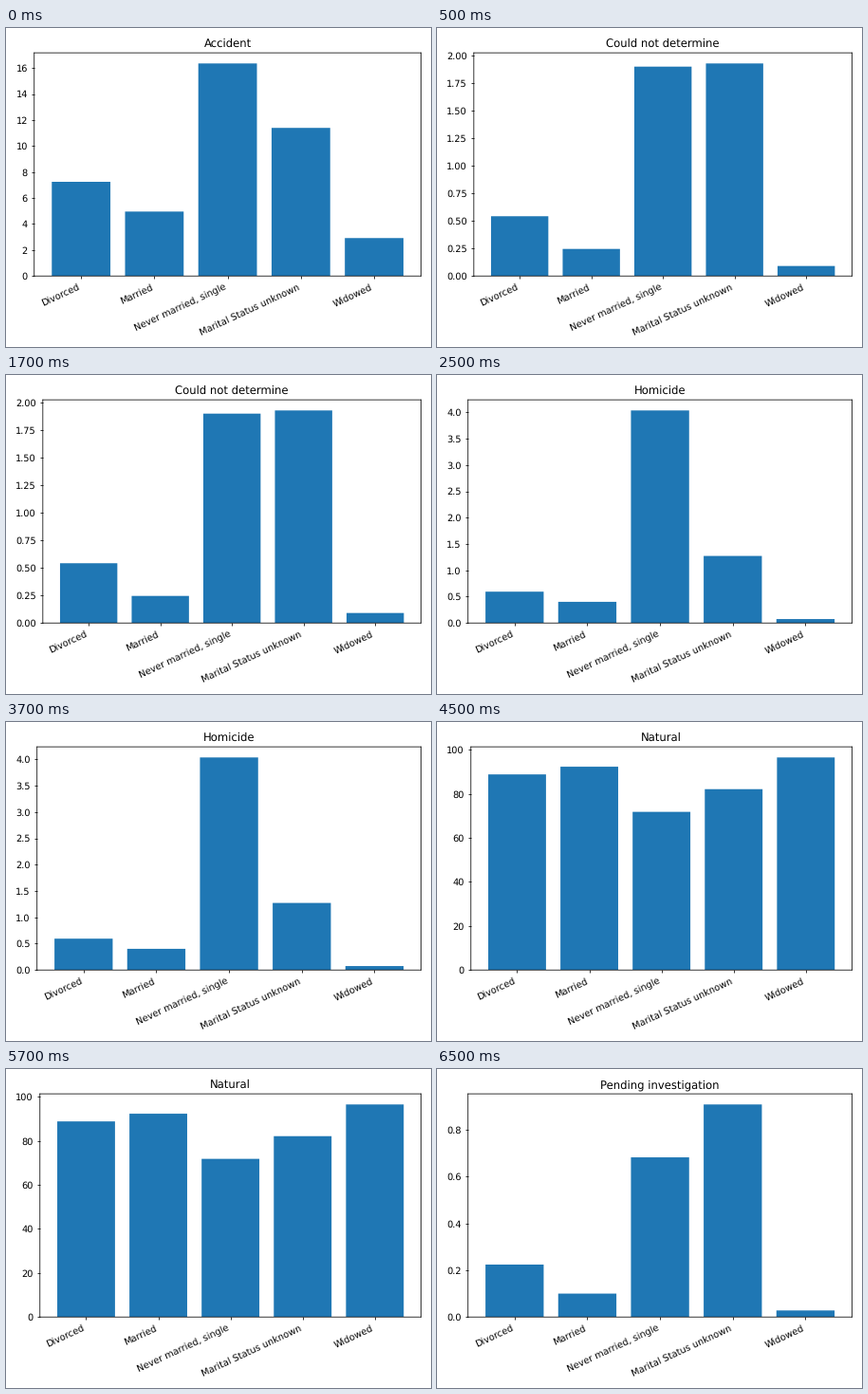
A matplotlib script for the animation above (8000 ms loop, 448 by 336 pixels).

```python
import matplotlib.pyplot as plt
from matplotlib.animation import FuncAnimation

STATUSES = ["Divorced", "Married", "Never married, single",
            "Marital Status unknown", "Widowed"]
CHARTS = [
    ("Accident", [7.25, 4.96, 16.36, 11.4, 2.92]),
    ("Could not determine", [0.543, 0.246, 1.902, 1.931, 0.091]),
    ("Homicide", [0.595, 0.402, 4.035, 1.273, 0.075]),
    ("Natural", [88.8, 92.3, 71.8, 82.1, 96.5]),
    ("Pending investigation", [0.224, 0.1, 0.682, 0.908, 0.028]),
]
STEP_MS = 500
STEPS = 16
STEPS_PER_CHART = 4
START_STEP = 3  # the loop opens on the last quarter of the first chart
STAGE_DPI = 70
LAYOUT_DPI = 100

# Soft edges: no rounding of lines or glyphs to whole pixels.
plt.rcParams.update({"path.snap": False, "text.hinting": "none"})

fig, ax = plt.subplots(figsize=(6.4, 4.8), dpi=STAGE_DPI)


def fit_layout():
    """Measure the labels at a finer resolution than the stage."""
    with plt.rc_context({"text.hinting": "force_autohint"}):
        fig.set_dpi(LAYOUT_DPI)
        fig.tight_layout()
        fig.set_dpi(STAGE_DPI)


def draw(step):
    title, shares = CHARTS[(step + START_STEP) // STEPS_PER_CHART]
    ax.clear()
    ax.bar(STATUSES, shares, color="tab:blue")
    ax.set_title(title)
    plt.setp(ax.get_xticklabels(), rotation=25, ha="right")
    fit_layout()
    return []


anim = FuncAnimation(fig, draw, frames=STEPS, init_func=lambda: draw(0),
                     interval=STEP_MS, repeat=True, repeat_delay=0)
plt.show()
```
